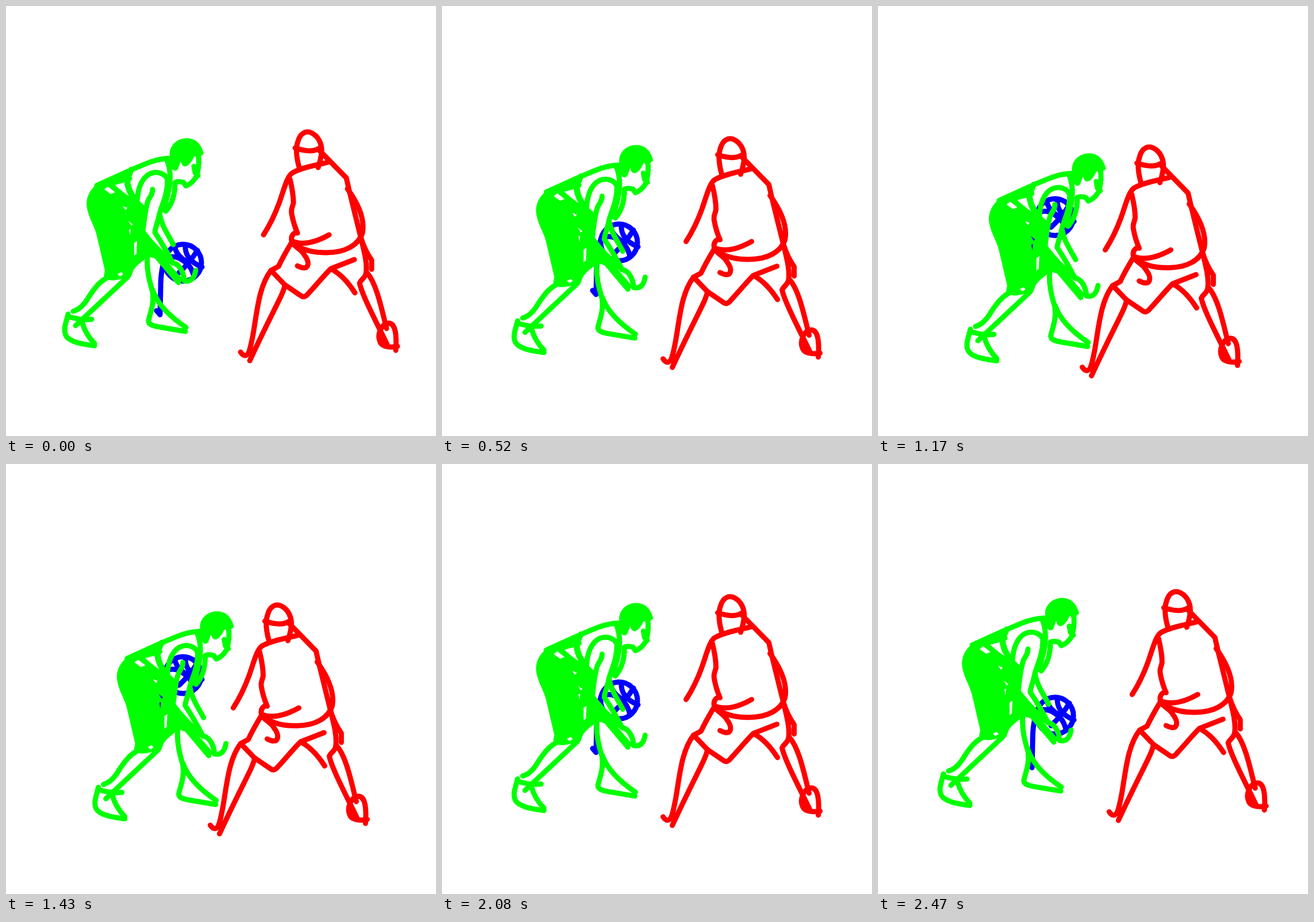
An HTML page that plays this animation: 748x748 px, repeating every 2600 ms.

```html
<!DOCTYPE html>
<html lang="en">
<head>
<meta charset="utf-8">
<title>Dribble</title>
<style>
  html, body { margin: 0; width: 100%; height: 100%; overflow: hidden; background: #fff; }
  svg { display: block; width: 100vw; height: 100vh; }
  g { fill: none; stroke-width: 9; stroke-linecap: round; stroke-linejoin: round; }
  #ball { stroke: #00f; }
  #attacker { stroke: #0f0; }
  #attacker .solid { fill: #0f0; fill-rule: evenodd; stroke: none; }
  #defender { stroke: #f00; }
</style>
</head>
<body>
<svg viewBox="0 0 748 748">
  <g id="ball">
    <circle cx="308" cy="446.5" r="32"/>
    <path d="M278 437C271 452 269 470 269 490L268 537L262 530"/>
    <!-- seams -->
    <path d="M281 438C296 432 308 442 317 450Q324 458 327 471
             M333 425Q320 446 301 464M294 420Q296 434 316 446
             M312 416C311 430 318 445 341 454"/>
  </g>

  <g id="attacker">
    <!-- hair -->
    <path class="solid" d="M286 266C280 246 296 229 316 230C334 231 341 245 344 257L338 262L327 262
             C323 272 316 280 310 279Q305 277 304 270L299 284Q295 288 291 284L284 274Z"/>
    <!-- face, neck, chest -->
    <path d="M334 258C337 272 335 284 331 297Q324 309 313 313L309 307Q299 304 294 307
             C294 330 288 346 278 357M327 279L329 290L334 295"/>
    <!-- back and jersey -->
    <path d="M284 265C258 266 240 276 220 284L158 312M162 314L215 300M176 305L218 286L212 300Z
             M218 284C206 300 213 320 224 335M210 292C208 315 216 332 236 349
             M178 306C195 325 216 338 236 350M280 268C289 290 285 318 278 340Q276 349 275 355"/>
    <path d="M280 268L294 282M228 340C229 318 236 299 250 292C264 286 277 292 281 302"/>
    <!-- arms -->
    <path d="M255 319C255 331 248 332 246 342C242 356 240 374 238 392
             M281 302C281 330 271 345 267 362C263 380 259 388 259 394Q274 416 290 447
             M267 361C271 384 282 397 291 415"/>
    <path d="M239 394Q258 420 290 447M252 424L300 481M264 432L302 476
             M290 447C300 448 309 461 310 478Q326 482 330 460"/>
    <!-- shorts -->
    <path class="solid" d="M157 311C143 322 138 338 141 352C145 372 154 382 158 400L172 460L170 470
             Q176 479 190 477L217 472L222 459C230 448 240 442 248 436L262 440L262 424L240 396L242 350
             L232 344L214 336L186 314Z
             M171 319L177 314L190 324L182 327Z M203 348L211 351L208 355Z
             M213 374L221 380L218 382Z M214 389L217 388L216 399Z
             M223 412L228 409L227 431L223 434Z M194 466L201 463L204 467L198 470Z"/>
    <!-- rear leg and shoe -->
    <path d="M180 471C164 477 154 491 144 506Q132 527 117 531M212 471L121 556
             M108 536C105 550 99 562 104 573C110 584 130 588 154 591M154 587Q138 571 132 549
             M108 540Q130 547 149 545"/>
    <!-- front leg -->
    <path d="M246 434C244 460 250 480 255 497C258 519 251 533 248 547C247 555 258 557 270 559
             L312 566M255 494C264 520 286 541 313 559"/>
  </g>

  <g id="defender">
    <!-- head -->
    <path d="M510 281C505 263 503 248 508 235C512 221 522 216 532 221C544 227 550 241 549 254Q548 266 543 281
             M503 247C515 251 530 254 540 250L546 247"/>
    <!-- shoulders and arms -->
    <path d="M546 252L592 299L597 321L617 402M563 271C545 276 512 281 497 291
             C488 299 484 318 475 343Q464 373 448 398
             M494 301C498 318 500 332 500 342C499 350 495 352 497 362Q500 379 507 395"/>
    <path d="M594 318C612 343 625 370 620 395C613 416 590 429 558 429Q520 430 497 411
             M617 402Q624 425 636 442V458"/>
    <!-- shorts -->
    <path d="M502 395Q495 400 497 409Q523 420 562 398M497 411C491 421 480 440 474 453L461 460L485 485
             L513 504Q519 509 526 500C540 485 552 470 565 457L606 441M565 457Q588 469 607 499
             M497 411C504 421 514 423 519 433C525 441 528 450 522 455Q516 457 507 452"/>
    <!-- legs and feet -->
    <path d="M461 460C440 487 437 530 430 570C426 591 423 608 416 608Q412 608 408 602
             M485 485C483 501 468 522 424 617"/>
    <path d="M617 402C624 430 629 450 626 466C624 474 618 475 615 482C620 505 646 553 664 591
             M628 464C645 483 654 530 662 561
             M681 592C665 595 652 592 650 582C646 572 652 554 664 552C677 550 680 570 678 599"/>
  </g>
</svg>
<script>
  const STEP = 130, COUNT = 20;
  // Travel per step, in stage pixels.
  const parts = [['ball', 0, -8.8], ['attacker', 5.85, 2.92], ['defender', -5.85, 2.92]]
    .map(([id, dx, dy]) => ({ el: document.getElementById(id), dx, dy }));
  const start = performance.now();

  function draw(now) {
    const i = Math.floor(Math.max(0, now - start) / STEP) % COUNT;
    const k = Math.min(i, COUNT - i);
    for (const { el, dx, dy } of parts) {
      el.setAttribute('transform', `translate(${dx * k} ${dy * k})`);
    }
    requestAnimationFrame(draw);
  }
  draw(start);
</script>
</body>
</html>
```
